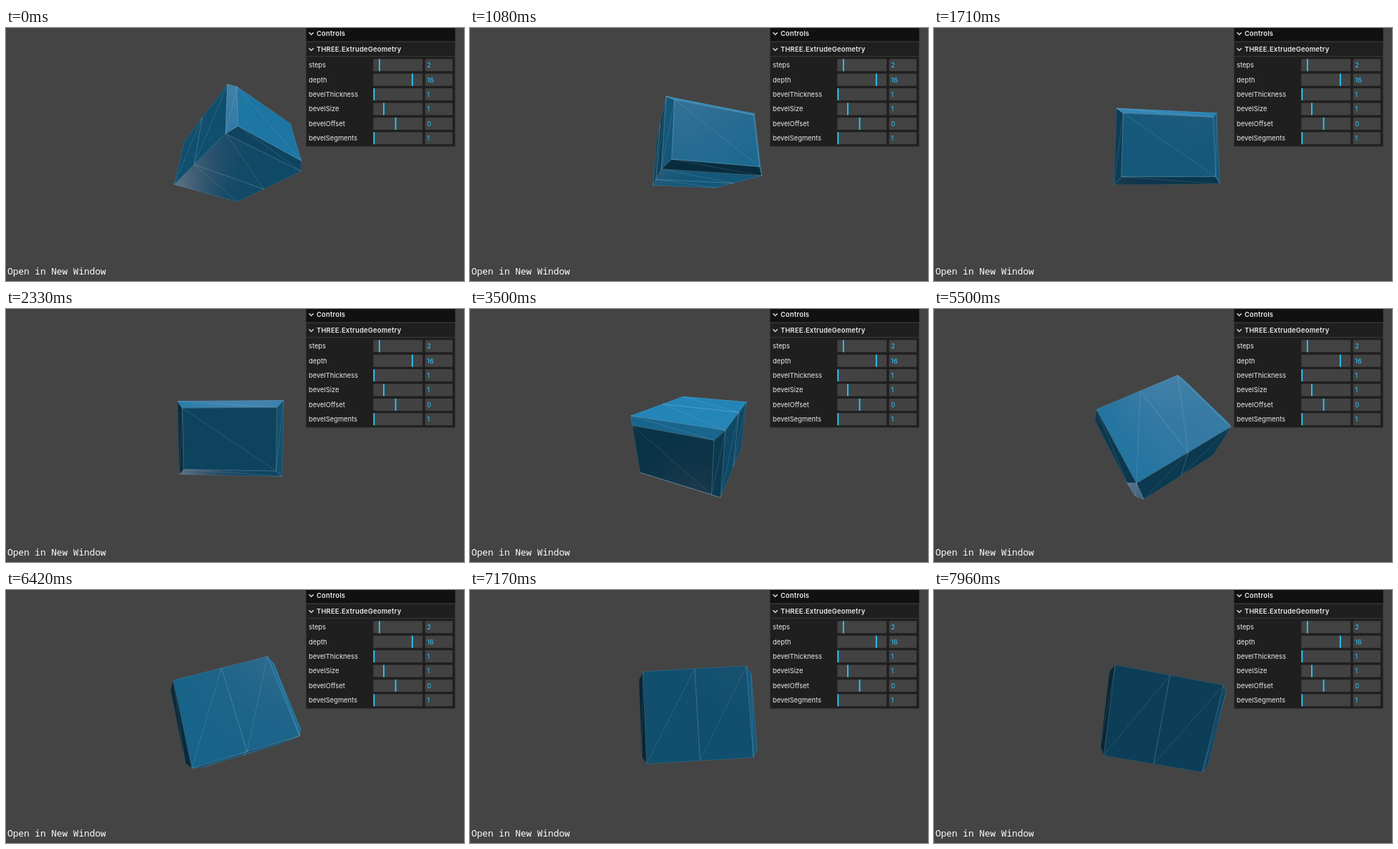
An HTML page with a canvas for the animation above (8000 ms loop, 640 by 353 pixels).

```html
<!DOCTYPE html>
<html lang="en">
<head>
<meta charset="utf-8">
<title>Extruded box</title>
<style>
  html, body { margin: 0; width: 100%; height: 100%; overflow: hidden; background: #444; }
  canvas, svg { position: absolute; left: 0; top: 0; width: 640px; height: 353px; }
  .ui { font: 9.35px Inter, sans-serif; fill: #ebebeb; }
  .title { font-weight: 600; letter-spacing: .23px; }
  .value { fill: #2cc9ff; }
  .widget { fill: #424242; }
  .chevron { fill: none; stroke: #ebebeb; stroke-width: 1.3; }
  .link { font: 12.75px "Noto Sans Mono", monospace; fill: #fff; }
</style>
</head>
<body>
<canvas id="stage" width="640" height="353"></canvas>
<svg viewBox="0 0 640 353">
  <g class="ui">
    <rect x="419.5" width="208" height="165.3" fill="#1f1f1f"/>
    <rect x="419.5" width="208" height="18.6" fill="#111"/>
    <path class="widget" d="M419.5 18.6h208v.9h-208zM419.5 38.9h208v.9h-208z"/>
    <path class="chevron" d="M423.4 6.2l3.2 3.2 3.2-3.2M423.4 28.2l3.2 3.2 3.2-3.2"/>
    <text class="title" x="434" y="11.2">Controls</text>
    <text class="title" x="434" y="33.2">THREE.ExtrudeGeometry</text>
    <g id="rows"></g>
  </g>
  <text class="link" x="2" y="344">Open in New Window</text>
</svg>
<script>
const ROWS = [
  ['steps', 2, 521.8], ['depth', 16, 567.8], ['bevelThickness', 1, 514.3],
  ['bevelSize', 1, 527.9], ['bevelOffset', 0, 544.5], ['bevelSegments', 1, 514.3]
];
document.getElementById('rows').innerHTML = ROWS.map(([label, value, knob], i) => {
  const y = 51.8 + i * 20.4;
  return `<text x="423" y="${y + 3.4}">${label}</text>
    <rect class="widget" x="513.2" y="${y - 8.5}" width="69" height="17" rx="1.5"/>
    <rect class="widget" x="585.6" y="${y - 8.5}" width="38.4" height="17" rx="1.5"/>
    <rect class="value" x="${knob - 0.9}" y="${y - 8.5}" width="1.8" height="17"/>
    <text class="value" x="588.3" y="${y + 3.4}">${value}</text>`;
}).join('');

const ctx = document.getElementById('stage').getContext('2d');
const CX = 317.7, CY = 175.6, FOCAL = 230, CAMERA_Z = 30;
const LOOP = 8000, FPS = 24;

const dot = (a, b) => a[0] * b[0] + a[1] * b[1] + a[2] * b[2];
const sub = (a, b) => a.map((v, i) => v - b[i]);
const cross = (a, b) => [a[1] * b[2] - a[2] * b[1], a[2] * b[0] - a[0] * b[2], a[0] * b[1] - a[1] * b[0]];
const unit = a => { const l = Math.hypot(...a); return a.map(v => v / l); };
const linear = c => c > 10.31 ? ((c / 255 + 0.055) / 1.055) ** 2.4 : c / 255 / 12.92;
const encode = c => Math.round(255 * Math.min(1, c > 0.0031308 ? 1.055 * c ** (1 / 2.4) - 0.055 : c * 12.92));

// Bevelled extrusion: a rectangular ring of four points per layer.
const LAYERS = [[6, 4, -9], [7, 5, -8], [7, 5, 0], [7, 5, 8], [6, 4, 9]];
const vertices = LAYERS.flatMap(([x, y, z]) => [[-x, -y, z], [-x, y, z], [x, y, z], [x, -y, z]]);
const faces = [];
for (let layer = 0; layer < 4; layer++) {
  for (let j = 0; j < 4; j++) {
    const k = (j + 3) % 4, low = layer * 4, high = low + 4;
    faces.push([low + k, low + j, high + j, high + k]);
  }
}
faces.push([1, 2, 3, 0], [17, 18, 19, 16]);

const LIGHTS = [[0, 1, 0], [1, 2, 1], [-1, -2, -1]].map(unit);
const INTENSITY = 3;
const DIFFUSE = [21, 98, 137].map(linear);
const EMISSIVE = [7, 37, 52].map(linear);
const SPECULAR = linear(17);

function rotate([x, y, z], a) {
  const s = Math.sin(a), c = Math.cos(a);
  const depth = x * s + z * c;
  return [x * c - z * s, y * c - depth * s, y * s + depth * c];
}

function project([x, y, z]) {
  const scale = FOCAL / (CAMERA_Z - z);
  return [CX + x * scale, CY - y * scale];
}

// Blinn-Phong highlight seen through one screen position.
function highlight(normal, lit, px, py) {
  const view = unit([CX - px, py - CY, FOCAL]);
  let sum = 0;
  for (const [light, amount] of lit) {
    const half = unit(light.map((v, i) => v + view[i]));
    const vh = Math.max(0, dot(view, half)), nh = Math.max(0, dot(normal, half));
    const fresnel = 2 ** ((-5.55473 * vh - 6.98316) * vh);
    sum += (SPECULAR * (1 - fresnel) + fresnel) * 4 / Math.PI * nh ** 30 * amount * INTENSITY;
  }
  return sum;
}

function tracePolygon(points) {
  ctx.beginPath();
  points.forEach(p => ctx.lineTo(...p));
  ctx.closePath();
}

function shadeFace(points, normal) {
  const lit = LIGHTS.map(l => [l, dot(l, normal)]).filter(([, amount]) => amount > 0);
  const light = lit.reduce((sum, [, amount]) => sum + amount, 0) * INTENSITY / Math.PI;
  const base = DIFFUSE.map((d, i) => d * light + EMISSIVE[i]);
  const colorAt = (x, y) => {
    const shine = highlight(normal, lit, x, y);
    return `rgb(${base.map(c => encode(c + shine))})`;
  };
  const xs = points.map(p => p[0]), ys = points.map(p => p[1]);
  const left = Math.floor(Math.min(...xs)), right = Math.max(...xs);
  const top = Math.floor(Math.min(...ys)), bottom = Math.max(...ys);

  tracePolygon(points);
  ctx.fillStyle = ctx.strokeStyle = colorAt((left + right) / 2, (top + bottom) / 2);
  ctx.lineWidth = 0.5;
  ctx.fill();
  ctx.stroke();
  ctx.save();
  ctx.clip();
  for (let y = top; y < bottom; y += 2) {
    for (let x = left; x < right; x += 2) {
      ctx.fillStyle = colorAt(x + 1, y + 1);
      ctx.fillRect(x, y, 2, 2);
    }
  }
  ctx.restore();
}

function draw(time) {
  const angle = -0.637 + 0.3 * time;
  const world = vertices.map(v => rotate(v, angle));
  const screen = world.map(project);
  // Each visible face adds to the strength of its edges, so silhouettes stay faint.
  const edges = new Map();
  const addEdge = (a, b, alpha) => {
    const key = Math.min(a, b) * 20 + Math.max(a, b);
    edges.set(key, (edges.get(key) || 0) + alpha);
  };

  ctx.fillStyle = '#444';
  ctx.fillRect(0, 0, 640, 353);
  for (const face of faces) {
    const [a, b, c] = face.map(i => world[i]);
    let normal = unit(cross(sub(b, a), sub(c, a)));
    if (dot(normal, a) < 0) normal = normal.map(v => -v);
    if (dot(normal, sub([0, 0, CAMERA_Z], a)) <= 0) continue;
    shadeFace(face.map(i => screen[i]), normal);
    face.forEach((v, i) => addEdge(v, face[(i + 1) % 4], 0.11));
    addEdge(face[0], face[2], 0.13);
  }

  ctx.lineWidth = 0.9;
  for (const [key, alpha] of edges) {
    ctx.strokeStyle = `rgba(255,255,255,${alpha})`;
    ctx.beginPath();
    ctx.moveTo(...screen[Math.floor(key / 20)]);
    ctx.lineTo(...screen[key % 20]);
    ctx.stroke();
  }
}

const start = performance.now();
let shown = -1;
function tick() {
  const elapsed = (performance.now() - start) % LOOP;
  const step = Math.floor((elapsed + 4) * FPS / 1000) % (LOOP * FPS / 1000);
  if (step !== shown) draw((shown = step) / FPS);
  requestAnimationFrame(tick);
}
tick();
</script>
</body>
</html>
```
